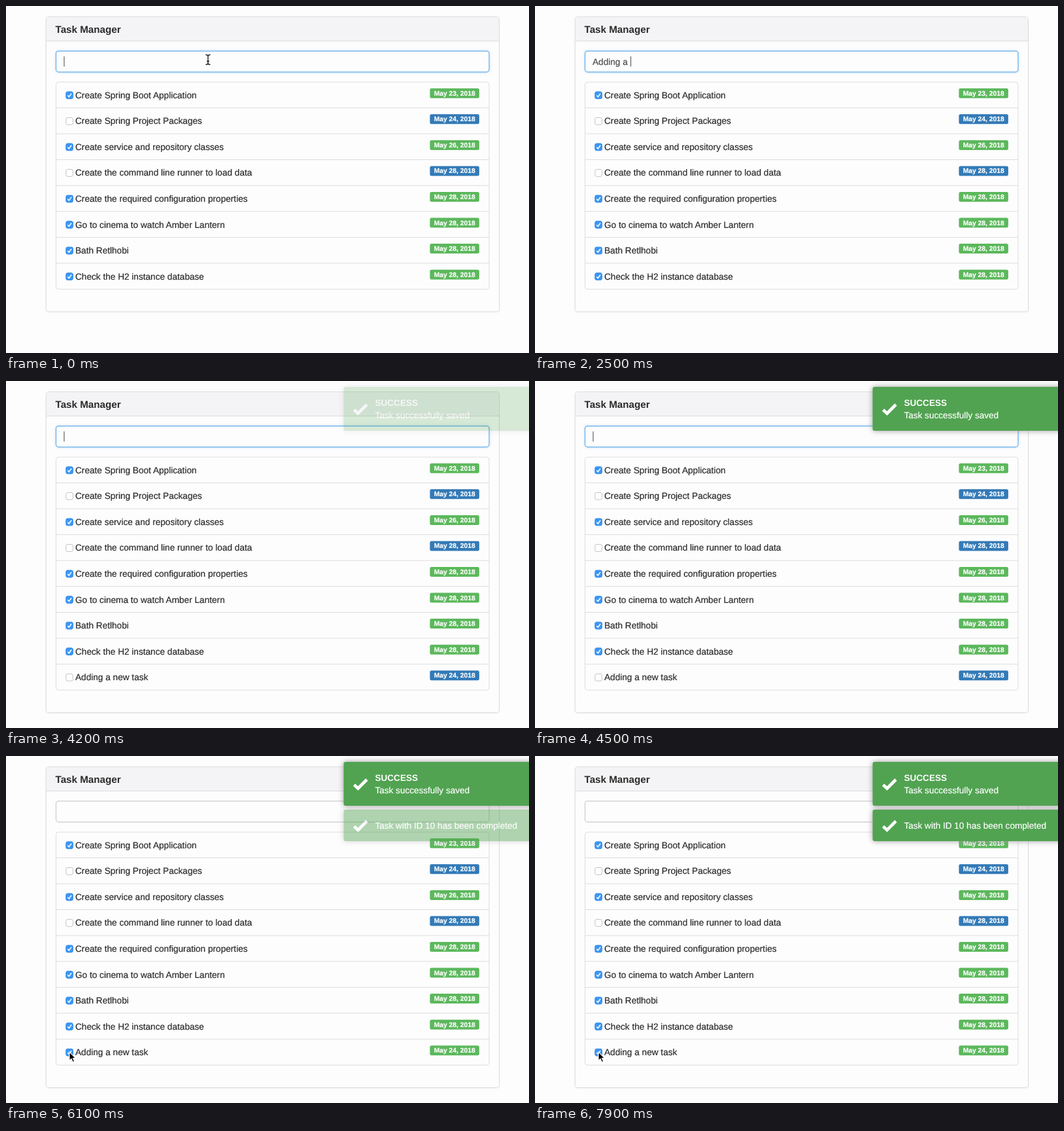
These frames come from a looping animation (800 px wide and 530 px high, 8 s). An HTML page:

```html
<!DOCTYPE html>
<html lang="en">
<head>
<meta charset="utf-8">
<title>Task Manager</title>
<style>
  html, body { margin: 0; width: 100%; height: 100%; overflow: hidden; background: #fefdfe; }
  svg { display: block; }
  text {
    font: 13.63px "Liberation Sans", Arial, sans-serif; white-space: pre;
    text-rendering: geometricPrecision; fill: #2b2b2b; stroke: #2b2b2b; stroke-width: .2px;
  }
  .title { font-size: 15.2px; font-weight: bold; stroke: none; }
  .typed { fill: #4a4a4a; stroke: #4a4a4a; }
  .badge { font-size: 10.3px; font-weight: bold; fill: #fff; stroke: #fff; text-anchor: middle; }
  .toast text { font-size: 13.55px; fill: #fff; stroke: #fff; }
  .toast .head { font-weight: bold; stroke: none; }
  .toast rect { fill: #51a351; filter: drop-shadow(0 0 4px #999); }
  .frame { fill: none; stroke: #ddd; }
  #panel { fill: #fefdfe; stroke: #ddd; filter: drop-shadow(0 1px 1px rgba(0,0,0,.05)); }
</style>
</head>
<body>
<svg id="stage" width="800" height="530" viewBox="0 0 800 530"></svg>
<script>
const LOOP = 8000;
const ROW = 39.55, LIST_TOP = 116;
const TYPE_START = 1500, TYPE_STEP = 115, SAVED = 4100;
const CHECKED = 5880, COMPLETED = 5950;
const NEW_TASK = "Adding a new task";
const GREEN = "#5cb85c", BLUE = "#337ab7";

const tasks = [
  ["Create Spring Boot Application", 23, true],
  ["Create Spring Project Packages", 24, false],
  ["Create service and repository classes", 26, true],
  ["Create the command line runner to load data", 28, false],
  ["Create the required configuration properties", 28, true],
  ["Go to cinema to watch Amber Lantern", 28, true],
  ["Bath Retlhobi", 28, true],
  ["Check the H2 instance database", 28, true],
  [NEW_TASK, 24, false]
];

const stage = document.getElementById("stage");

function add(parent, tag, attrs = {}, content = "") {
  const node = document.createElementNS("http://www.w3.org/2000/svg", tag);
  set(node, attrs);
  node.textContent = content;
  parent.appendChild(node);
  return node;
}
function set(node, attrs) {
  for (const key in attrs) node.setAttribute(key, attrs[key]);
}
const show = (node, on) => node.setAttribute("visibility", on ? "inherit" : "hidden");

// Panel and header
const panel = add(stage, "rect", { id: "panel", x: 61.3, y: 16.5, width: 693.2, rx: 4 });
add(stage, "path", { d: "M62 53V20.5a3.5 3.5 0 0 1 3.5-3.5H750.5a3.5 3.5 0 0 1 3.5 3.5V53z", fill: "#f4f3f5" });
add(stage, "path", { d: "M62 53.5H754", class: "frame" });
add(stage, "text", { x: 75.5, y: 41.3, class: "title" }, "Task Manager");

// Input field
const field = add(stage, "rect", { x: 76.5, y: 68.8, width: 662.5, height: 32, rx: 4, fill: "#fefdfe" });
const typed = add(stage, "text", { x: 88, y: 89.8, class: "typed" });
const caret = add(stage, "rect", { y: 77, width: 1.1, height: 15.5, fill: "#555" });

// Task list
const rows = tasks.map(([label, day, done], i) => {
  const row = add(stage, "g", { transform: `translate(0 ${LIST_TOP + i * ROW})` });
  if (i) add(row, "path", { d: "M77 0H739", class: "frame" });
  const box = add(row, "rect", { x: 91.8, y: 14.9, width: 10.6, height: 10.8, rx: 2.4 });
  const tick = add(row, "path", { d: "M94.3 20.6l2 2.3 3.7-5.2", fill: "none", stroke: "#fff", "stroke-width": 1.5 });
  add(row, "text", { x: 106, y: 24.8 }, label);
  const badge = add(row, "rect", { x: 648.4, y: 9.8, width: 75.5, height: 15, rx: 2.5 });
  add(row, "text", { x: 686.2, y: 20.8, class: "badge" }, `May ${day}, 2018`);
  const check = on => {
    set(box, on ? { fill: "#3b97f5", stroke: "#318bea" } : { fill: "#fff", stroke: "#c3c3c5" });
    show(tick, on);
  };
  const paint = on => set(badge, { fill: on ? GREEN : BLUE });
  check(done);
  paint(done);
  return { row, check, paint };
});
const newRow = rows[rows.length - 1];
const list = add(stage, "rect", { x: 76.5, y: 116.2, width: 662.5, rx: 4, class: "frame" });

// Notifications
function makeToast(y, height, lines) {
  const toast = add(stage, "g", { class: "toast", transform: `translate(516.5 ${y})` });
  add(toast, "rect", { width: 289, height, rx: 3 });
  add(toast, "path", {
    d: `M16 ${height / 2 + 1.5}l6 5.5 13.5-13.5`,
    fill: "none", stroke: "#fff", "stroke-width": 4.6
  });
  lines.forEach(([text, top, cls]) => add(toast, "text", { x: 48, y: top, class: cls }, text));
  return toast;
}
const savedToast = makeToast(9, 67, [["SUCCESS", 29, "head"], ["Task successfully saved", 48, ""]]);
const doneToast = makeToast(82, 48, [["Task with ID 10 has been completed", 29, ""]]);

// Pointers
const beam = add(stage, "g", { fill: "none" });
const beamPath = "M-3.5-7.5Q0-7.5 0-5.5Q0-7.5 3.5-7.5M0-5.5V5.5M-3.5 7.5Q0 7.5 0 5.5Q0 7.5 3.5 7.5M-1.8 2.5H1.8";
add(beam, "path", { d: beamPath, stroke: "#fff", "stroke-width": 2.6, opacity: .7 });
add(beam, "path", { d: beamPath, stroke: "#111", "stroke-width": 1.3 });
const arrow = add(stage, "path", {
  d: "M0 0V13.3L3 10.5L5.2 15.5L7.7 14.4L5.5 9.6H9.5Z",
  fill: "#000", stroke: "#fff", "stroke-width": 1.1
});

const clamp = v => Math.max(0, Math.min(1, v));
const swing = p => .5 - Math.cos(Math.PI * clamp(p)) / 2;
const mix = (a, b, p) => a + (b - a) * p;

function drawInput(t) {
  const count = t < TYPE_START || t >= SAVED ? 0
    : Math.min(NEW_TASK.length, 1 + Math.floor((t - TYPE_START) / TYPE_STEP));
  typed.textContent = NEW_TASK.slice(0, count);
  const lastKey = TYPE_START + (NEW_TASK.length - 1) * TYPE_STEP;
  const typing = t >= TYPE_START && t < lastKey;
  const since = t >= SAVED ? t - SAVED : t >= lastKey ? t - lastKey : t;
  const focused = t < CHECKED;
  show(caret, focused && (typing || since % 1000 < 500));
  set(caret, { x: 88.4 + (count ? typed.getComputedTextLength() : 0) });
  set(field, { stroke: focused ? "#66afe9" : "#ccc", "stroke-width": 1.2 });
  field.style.filter = focused ? "drop-shadow(0 0 2px rgba(102,175,233,.4))" : "none";
}

function drawPointer(t) {
  const down = swing((t - 4650) / 650), across = swing((t - 5450) / 300);
  const x = mix(mix(309, 126, down), 97, across);
  const y = mix(mix(82, 446, down), 452, across);
  const overBox = across > .75;
  set(beam, { transform: `translate(${x} ${y})` });
  set(arrow, { transform: `translate(${x} ${y})` });
  show(beam, (t < TYPE_START || t >= 4650) && !overBox);
  show(arrow, overBox);
}

function draw(t) {
  const saved = t >= SAVED;
  const count = saved ? 9 : 8;
  set(panel, { height: 134 + count * ROW });
  set(list, { height: count * ROW });
  set(newRow.row, { display: saved ? "inline" : "none" });
  newRow.check(t >= CHECKED);
  newRow.paint(t >= COMPLETED);
  drawInput(t);
  set(savedToast, { opacity: swing((t - SAVED) / 320) });
  set(doneToast, { opacity: swing((t - COMPLETED) / 320) });
  drawPointer(t);
}

const start = performance.now();
function tick() {
  draw((performance.now() - start) % LOOP);
  requestAnimationFrame(tick);
}
tick();
</script>
</body>
</html>
```
